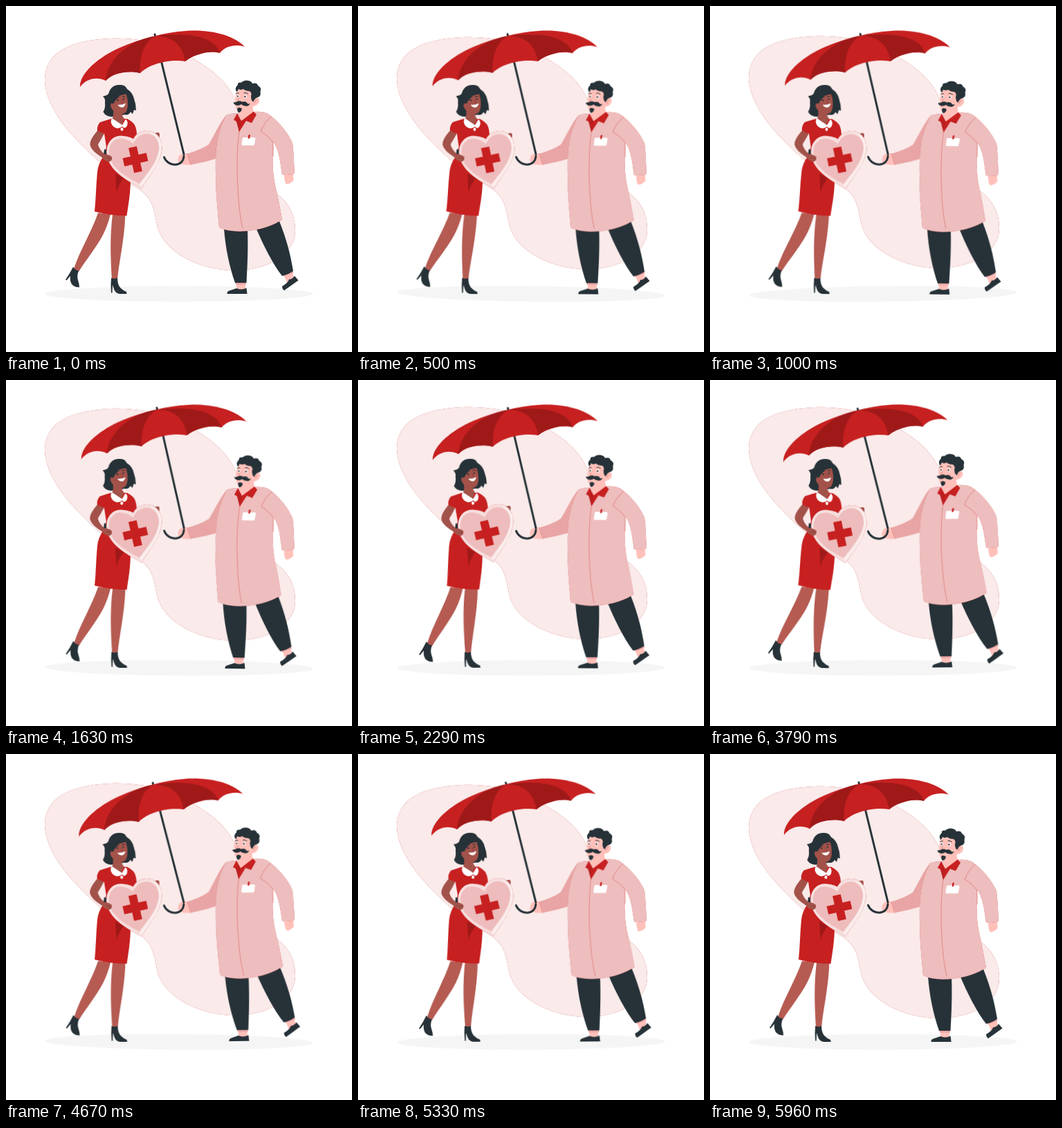
Recreate the animation shown at these times as an HTML page. Size 500 by 500 pixels, loop 6 s.

```html
<!DOCTYPE html>
<html lang="en">
<head>
<meta charset="utf-8">
<title>Health cover</title>
<style>
  html, body { margin: 0; height: 100%; overflow: hidden; background: #fff; }
  svg { display: block; width: 100%; height: 100%; }

  .red { fill: #c72020; }
  .deep { fill: #9f1919; }
  .ink { fill: #263238; }
  .white { fill: #fff; }
  .pale { fill: #eebcbc; }
  .sleeve { fill: #e9a5a5; }
  .brown { fill: #a3524a; }
  .leg { fill: #b55b52; }
  .peach { fill: #ffc0b9; }
  .line { fill: none; stroke-linecap: round; stroke-linejoin: round; }
  .rod { stroke: #263238; stroke-width: 3; }
  .thin { stroke: #263238; stroke-width: 1; }
  .seam { stroke: #e07f7f; stroke-width: .9; }
  .crease { stroke: #7d3a32; stroke-width: .8; }

  #cloud { animation: float 6s linear infinite; }
  #shadow { transform-origin: 250px 416px; animation: sway 1.5s linear infinite; }
  #woman { transform-origin: 156px 265px; animation: sway 3s linear infinite; }
  #man { transform-origin: 264px 226px; animation: sway 6s linear infinite; }

  @keyframes float {
    50% { transform: translateY(-10px); }
  }
  @keyframes sway {
    0%, 100% { transform: rotate(0deg); }
    25% { transform: rotate(1deg); }
    75% { transform: rotate(-1deg); }
  }
</style>
</head>
<body>
<svg viewBox="0 0 500 500">
  <defs>
    <path id="blob" d="M56 108C56 68 90 50 150 47C210 45 248 62 281 82.500C317 105 332 129 338 157C346 205 352 240 385 267C408 282 418 300 418 325C418 358 380 382 330 382C280 382 225 355 218 315C213 290 212 275 183 259C160 245 147 235 133 223C98 192 58 150 56 108Z"/>
    <path id="heart" d="M196 264C176 253 153 240 147 221C141 201 153 187 166 187.500C175 188 181 190 184 192C188 184 196 180 205 180C218 181 226 192 225.500 207C223 228 207 246 196 264Z"/>
    <path id="coat" d="M318 158C326 155 331 155 335 155L358 153C367 152 374 153 379 156C393 166 407 182 414 198C416 213 416 228 417 242Q408 245 399 243.500C397 230 395 207 386 196C385 223 385 240 389 259C393 276 396 292 399 309C386 317 371 322 357 324C338 327 320 326 308 320C306 296 303 270 303 242C303 212 302 190 318 158Z"/>
  </defs>

  <g id="cloud">
    <use href="#blob" class="red"/>
    <use href="#blob" class="white" opacity=".905"/>
  </g>

  <ellipse id="shadow" cx="250" cy="416" rx="194" ry="11.300" fill="#f5f5f5"/>

  <g id="man">
    <!-- legs and shoes -->
    <path class="peach" d="M332 397H346.500L345.500 411H333.500ZM400 385L413 380L416 393L406 400Z"/>
    <path class="sleeve" d="M331 399H347V402.500H332ZM400 388L414 382L415.500 385.500L401.500 391Z"/>
    <path class="ink" d="M315 321C317 350 323 377 331 400H347.500C349 373 350 350 349 321ZM361 320C372 346 385 372 399 390Q408 388 415 383C411 358 405 336 395 311Z"/>
    <path class="ink" d="M333 408Q340 411 347.500 407.500L348.500 416H319.500Q319 412 324 411ZM399 405C405 402 408 398 409 395Q414 395 417 390L422.500 396.500Q416 401 412 404L402 411Q399 409 399 405Z"/>

    <!-- hands -->
    <path class="peach" d="M402 242.500L415 242L415.500 252Q411 257 405 257.500Q402 254 402 242.500Z"/>
    <path class="peach" d="M269 214L259 213Q252 213 250 217Q247 222 250 227Q257 231 269 229Z"/>

    <!-- umbrella -->
    <path class="line rod" d="M215 41L257 214M257 217C256 233 234 233 228.500 218.500"/>
    <path class="red" d="M107 117C106 97 135 73 165 60C195 47 230 38 260 36C298 33.500 330 43 345 59C333 55 318 57 309 68C297 64 274 68 259 80C237 76 206 84 194 97C178 93 155 96 144 108C130 101 115 106 107 117Z"/>
    <path class="deep" d="M216 43.500C177 49 145 79 144 108C155 96 178 93 194 97C192 73 200 51 216 43.500ZM216 43.500C240 43 256 57 259 80C274 68 297 64 309 68C304 48 272 36 216 43.500Z"/>

    <!-- holding arm -->
    <path class="sleeve" d="M318 158C309 168 302 185 293 200C284 206 273 210 262 213.500Q264 222 267 229.500Q287 226 306 220Z"/>
    <path class="line seam" d="M262 213.500Q264 222 267 229.500" opacity=".6"/>

    <!-- coat -->
    <use href="#coat" class="red"/>
    <use href="#coat" class="white" opacity=".7"/>
    <path class="line seam" d="M337 181C334 205 333 236 335 262C336 284 338 304 342 321M383 160Q374 167 368 181Q380 188 386 197V217"/>
    <path class="white" d="M342 190H359Q361 190 360.500 192L359 200Q358.500 201.500 357 201.500H342Q340 201.500 340.500 199.500Z"/>
    <path class="red" d="M350.500 186.500Q352 185 353 186.500L352 191.500H349.500Z"/>

    <!-- neck and collar -->
    <path class="peach" d="M337 148L357 142Q356 150 359 155L341 169Q336 162 337 148Z"/>
    <path class="red" d="M334 155L340 166L358 152.500L362 157L355 169L347 166L337 182L333 167L329 164.500Z"/>
    <path class="deep" d="M335 162L340 166L337 181L333 167Z" opacity=".3"/>

    <!-- head -->
    <path class="peach" d="M334 122C331 130 330 140 332 147Q335 155 342 154.500Q351 153 357 145Q364 144 366 138Q367 132 361 132L357 120Q344 116 334 122Z"/>
    <path class="ink" d="M333 124Q330 118 335 114Q334 110 340 110.500Q345 106 351 108Q355 109 356 112Q363 110 364 115Q370 118 367.500 124Q369 130 364 132Q360 132 357.500 138.500Q354 137 354 130Q356 126 352 123Q346 123 343 120Q339 122 336 120Q335 123 333 124Z"/>
    <path class="line seam" d="M362 135Q360 136 359 140M337 132Q334 136 336 138"/>
    <ellipse class="white" cx="335.500" cy="130.500" rx="1.600" ry="2.200"/>
    <ellipse class="white" cx="346" cy="131" rx="1.900" ry="2.400"/>
    <circle class="ink" cx="335" cy="130.500" r="1.100"/>
    <circle class="ink" cx="345.500" cy="131" r="1.200"/>
    <path class="line thin" d="M332.500 126.500Q334 125 336.500 126M344 125.500Q347 124.500 349.500 127"/>
    <path class="ink" d="M328.500 139Q331 140 334 138Q338 136.500 341 138.500Q347 137 349 141Q351 142 353 140.500Q351 145.500 346 144.500Q342 144 340 142Q337 144.500 333 143.500Q329 142.500 328.500 139Z"/>
    <path class="ink" d="M334.500 147.500Q338 145.500 341 148.500Q340 153.500 336 154Q333.500 151 334.500 147.500Z"/>
  </g>

  <g id="woman">
    <!-- legs and shoes -->
    <path class="leg" d="M133 299C124 326 107 352 98 380L105 384C115 368 131 348 140 331Q147 317 151 301ZM154 301C150 333 151 363 153 396H161C163 370 171 340 172.500 301Z"/>
    <path class="ink" d="M97 377Q100 382 105 382.500Q102 391 104 396Q106 402 106 406.500Q99 406.500 95 402Q92 397 93 390L87.500 396.500L86 395.500Q92 387 97 377Z"/>
    <path class="ink" d="M152 393Q157 395 161 393Q161 402 165 407Q169 411 174 413L174.500 416H164Q158 415 156 409L154 403L153.500 414.500H152Q151 403 152 393Z"/>

    <!-- dress -->
    <path class="red" d="M136 168Q145 165 152 163H175Q183 167 186 172Q189 178 189 187L184 195L180 250C180 270 177 286 174.500 303Q150 303 128 297C130 278 130 260 132 240Q133 228 141 217L145 204L142 184Q137 182 132 180Q132 173 136 168Z"/>
    <path class="deep" d="M158 242L159.500 269Q163 257 170 249Z"/>
    <path class="ink" d="M142 207L146 208L145 216L141 215Z"/>

    <!-- hair, neck and collar -->
    <path class="ink" d="M152 119Q156 114 164 114Q172 113 175 120Q183 125 185 134Q188 142 188 151L185 150L183 156L180 153Q178 158 172 157L153 160Q144 160 140.500 153Q144 147 143 140Q144 134 140 130.500Q149 129 149 124Q150 121 152 119Z"/>
    <path class="brown" d="M155 151L168 153V163L168 173L153 164Q156 159 155 151Z"/>
    <path class="white" d="M153 162L168 172L173 163.500Q177 167 175 173Q172 179 168 174Q161 180 154 173Q150 168 153 162Z"/>
    <path class="brown" d="M155 160L167 171L171 163L167 157Z"/>
    <ellipse class="white" cx="167.500" cy="178" rx="2" ry="2.600"/>

    <!-- face -->
    <path class="brown" d="M157 130Q165 131 173 126Q176.500 134 176 144Q175.500 155 168 156Q160 157 155 151Q150 146 151.500 141.500Q153.500 139 156 140Z"/>
    <path class="ink" d="M150 138Q151 124 162 121Q171 119 174.500 126.500Q170 129 165 127.500Q161 134 157 138Q156 142 154 141Z"/>
    <circle class="ink" cx="161.500" cy="136" r="1.200"/>
    <circle class="ink" cx="170" cy="134.500" r="1.100"/>
    <path class="line thin" d="M158.500 132.500Q161 130.500 163.500 131.500M168 131Q170 129.500 172 131"/>
    <path class="line crease" d="M167 135Q169.500 138 168 139.500"/>
    <path class="white" d="M161.500 142.500Q167 143.500 173 140.500Q171.500 147 167 146.500Q163 146 161.500 142.500Z"/>

    <!-- heart shield -->
    <path class="brown" d="M212 186Q217 182 221 183Q223 186 221 191L217 193Z"/>
    <use href="#heart" class="red"/>
    <use href="#heart" class="white" opacity=".85"/>
    <path class="white" opacity=".45" d="M195 263L193 257C205 243 220 226 221.500 205Q221 190 208 183Q222 185 225 200Q225 222 211 241Z"/>
    <path class="pale" d="M193 257C174 247 155 236 150 219C146 203 154 192 165 191.500C174 192 181 196 184 199C188 190 195 185 203 184.500C215 185 221.500 194 221 206C219 226 204 241 193 257Z"/>
    <path class="red" transform="translate(187 222) rotate(-12.500)" d="M-6 -18.500H6V-6H17.500V6H6V18.500H-6V6H-17.500V-6H-6Z"/>

    <!-- front arm -->
    <path class="brown" d="M133 179C127 186 121 194 121.500 201Q123 209 139 219Q143 225 150 225Q154 223 153 218Q148 214 142 214Q134 206 133 200Q138 192 142 184Z"/>
    <path class="red" d="M136 168Q131 174 132 180Q138 184 144 185L147 170Z"/>
    <path class="line crease" d="M146 219L152 221"/>
  </g>
</svg>
</body>
</html>
```
